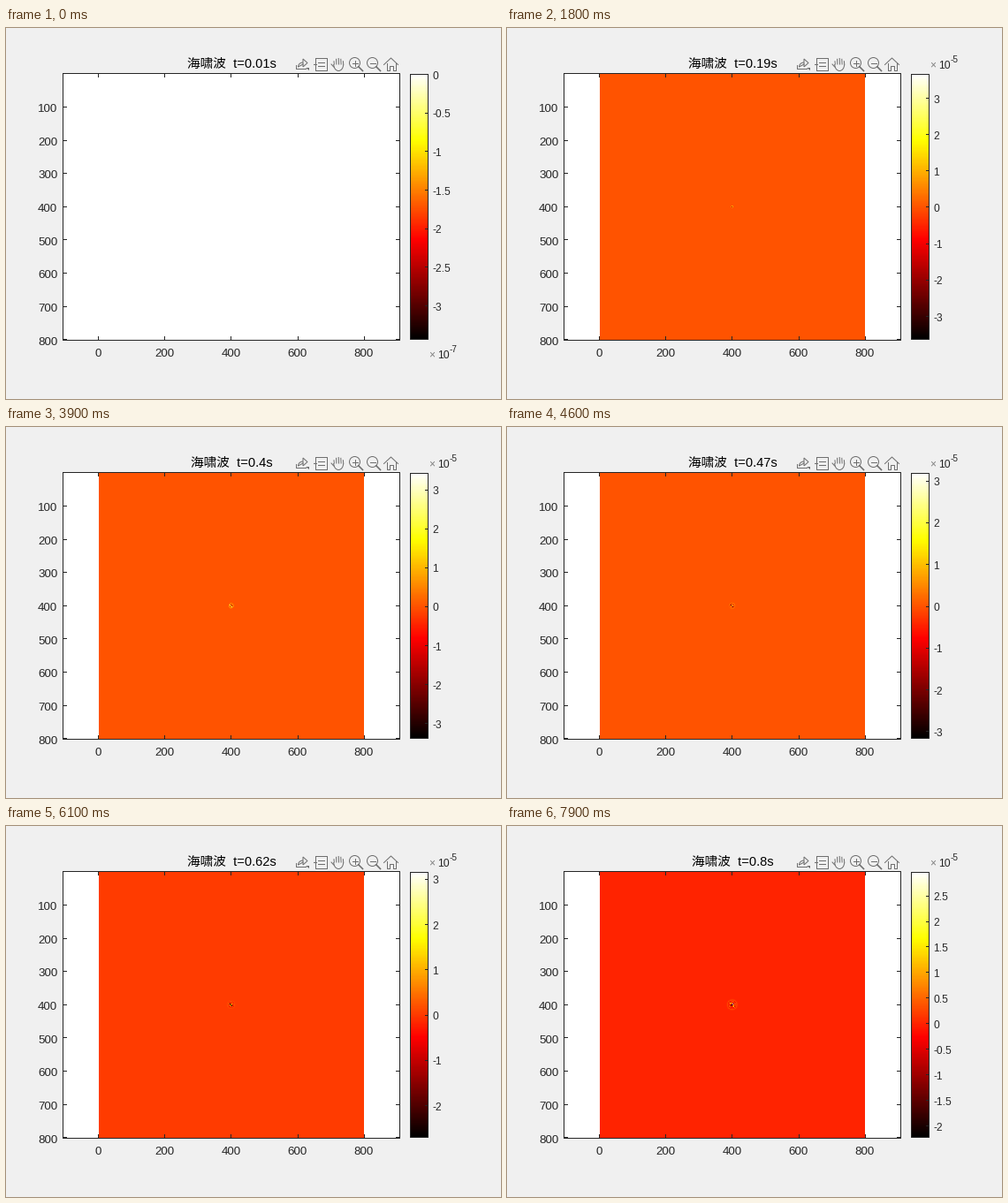
Animation of 560x420 px, one loop 8 s. Source, as a matplotlib script:

```python
import numpy as np
import matplotlib.pyplot as plt
from matplotlib.animation import FuncAnimation
from matplotlib.colors import ListedColormap
from matplotlib.patches import Arc, Circle, Polygon, Rectangle

STEPS = 80
GRID, HALF = 800, 40
L, R, T, B = 64, 445, 51, 353
BAR_L, BAR_R, BAR_T, BAR_B = 457, 477, 52, 352
INK, ICON = "#262626", "#6e6e6e"
PX = 0.72  # points per pixel at 100 dpi

plt.rcParams["font.family"] = ["Liberation Sans", "Noto Sans CJK JP"]

ramp = np.linspace(0, 1, 256)
HOT = ListedColormap(np.clip(
    np.stack([ramp / 0.375, (ramp - 0.375) / 0.375, (ramp - 0.75) / 0.25], axis=1), 0, 1))


def simulate(speed=0.2, omega=0.45):
    """Point-driven wave equation on a small patch around the centre."""
    size = 2 * HALF + 1
    old, now = np.zeros((size, size)), np.zeros((size, size))
    states = []
    for n in range(1, STEPS + 1):
        lap = sum(np.roll(now, s, a) for s in (-1, 1) for a in (0, 1)) - 4 * now
        new = 2 * now - old + speed ** 2 * lap
        new[HALF, HALF] += np.sin(omega * n)
        old, now = now, new
        states.append(now)
    return states


def ripple(n, peak, period):
    return np.cos(2 * np.pi * (n - peak) / period)


def limits(n):
    """Lowest and highest height in units of 1e-5: a quick rise, then slow decay."""
    low = 3.66 - 0.0145 * n + 0.36 * ripple(n, 42.5, 27)
    high = 3.78 - 0.0115 * n + 0.1 * ripple(n, 40, 20)
    low *= 1 - np.exp(-(n / 4.57) ** 3)
    high *= 1 - np.exp(-(max(n - 8, 0) / 4) ** 2)
    return -low, high


def field(n):
    """Full grid of heights, fitted to the limits at step n."""
    u = waves[n - 1]
    lo, hi = limits(n)
    up = u / max(u.max(), 1e-12) * hi
    down = u / min(u.min(), -1e-12) * lo
    full = np.zeros((GRID, GRID))
    a = GRID // 2 - 1 - HALF
    full[a:a + 2 * HALF + 1, a:a + 2 * HALF + 1] = np.where(u > 0, up, down)
    return full


waves = simulate()

fig = plt.figure(figsize=(5.6, 4.2), dpi=100, facecolor="#f0f0f0")
ax = fig.add_axes([0, 0, 1, 1])
ax.axis("off")


def line(xs, ys, color=INK, width=1):
    return ax.plot(xs, ys, color=color, lw=width * PX, zorder=4)[0]


def box(x0, y0, x1, y1, color=INK):
    line([x0, x1, x1, x0, x0], [y0, y0, y1, y1, y0], color)


def label(x, y, s, size, color=INK, **kw):
    return ax.text(x, y, s, fontsize=size * PX, color=color, va="baseline", **kw)


def col(v):
    return 103.8 + 0.3763 * v


def row(v):
    return 51.3 + 0.3763 * v


def draw_axes():
    ax.add_patch(Rectangle((L, T), R - L, B - T, fc="white", ec="none", zorder=0))
    box(L, T, R, B)
    for v in range(0, GRID + 1, 200):
        for edge, d in ((B, -4), (T, 4)):
            line([col(v)] * 2, [edge, edge + d])
        label(col(v), 372, str(v), 13.33, ha="center")
    for v in range(100, GRID + 1, 100):
        for edge, d in ((L, 4), (R, -4)):
            line([edge, edge + d], [row(v)] * 2)
        label(58.3, row(v) + 6.2, str(v), 13.33, ha="right")


def draw_export(x, y):
    line([x - 7, x - 7, x + 4], [y + 1, y + 5, y + 5], ICON)
    ax.add_patch(Arc((x + 1, y + 3), 11, 10, theta1=180, theta2=270, ec=ICON, lw=PX))
    line([x - 4.5, x + 1], [y + 3, y], ICON)
    ax.add_patch(Polygon([(x + 1, y - 6), (x + 6, y - 1.5), (x + 1, y + 3)],
                         fill=False, ec=ICON, lw=PX))
    ax.add_patch(Polygon([(x + 4, y + 4), (x + 8, y + 4), (x + 8, y + 7)],
                         fc=ICON, ec="none"))


def draw_tips(x, y):
    box(x - 6, y - 7, x + 7, y + 7, ICON)
    line([x - 8, x - 5], [y, y], ICON)
    for d in (-2, 2):
        line([x - 3, x + 4], [y + d, y + d], ICON)


def draw_hand(x, y):
    for k in range(5):
        fx = x - 4.5 + 2.6 * k
        line([fx, fx + 0.3], [y - 6.5 + 0.8 * (k - 2) ** 2, y], ICON)
    ax.add_patch(Arc((x + 0.7, y), 11, 15, theta1=0, theta2=180, ec=ICON, lw=PX))
    line([x - 4.8, x - 7.5], [y + 3, y], ICON)


def draw_zoom(x, y, plus):
    ax.add_patch(Circle((x, y), 6, fill=False, ec=ICON, lw=PX))
    line([x + 4.3, x + 9], [y + 4.3, y + 9], ICON, 1.6)
    line([x - 3, x + 3], [y, y], ICON)
    if plus:
        line([x, x], [y - 3, y + 3], ICON)


def draw_home(x, y):
    line([x - 8, x, x + 8], [y + 0.5, y - 7, y + 0.5], ICON)
    for side in (-1, 1):
        line([x + side * k for k in (5, 5, 2, 2, 0)],
             [y - 1, y + 7, y + 7, y + 2, y + 2], ICON)


draw_axes()
draw_export(335, 41)
draw_tips(356, 41)
draw_hand(375.5, 41)
draw_zoom(394.5, 39.5, True)
draw_zoom(414.5, 39.5, False)
draw_home(435.5, 41)

sea = ax.imshow(np.zeros((GRID, GRID)), cmap=HOT, interpolation="nearest",
                extent=(105, 405, 353, 52), aspect="auto", zorder=1)
ax.imshow(ramp[::-1, None], cmap=HOT, interpolation="nearest", aspect="auto",
          extent=(BAR_L, BAR_R, BAR_B, BAR_T), zorder=1)
box(BAR_L, BAR_T, BAR_R, BAR_B)
ax.set_xlim(0, 560)
ax.set_ylim(420, 0)

title = label(255, 45.2, "", 14.67, "black", ha="center")
times = label(478.5, 46, "×", 12, "#808080")
ten = label(488.3, 46, "10", 12.3)
power = label(502, 39.5, "", 10)
scale_marks = []


def draw_scale(lo, hi):
    """Colour bar ticks, labels and exponent."""
    while scale_marks:
        scale_marks.pop().remove()
    exp = int(np.floor(np.log10(max(-lo, hi))))
    lo, hi = lo / 10.0 ** exp, hi / 10.0 ** exp
    span = hi - lo
    step = 1 if span > 5.5 else 0.5 if span > 2.5 else 0.2
    for k in range(int(np.ceil(lo / step)), int(np.floor(hi / step)) + 1):
        y = BAR_T + (hi - k * step) / span * (BAR_B - BAR_T)
        scale_marks.append(line([BAR_R - 3.5, BAR_R], [y, y]))
        scale_marks.append(label(482.5, y + 5.6, f"{k * step:g}", 12))
    base = 373.5 if -lo > hi else 45.7
    times.set_y(base)
    ten.set_y(base)
    power.set_y(base - 6.5)
    power.set_text(str(exp - 5))


def update(i):
    n = i + 1
    lo, hi = limits(n)
    sea.set_data(field(n))
    sea.set_clim(lo, hi)
    title.set_text(f"海啸波  t={n / 100:g}s")
    draw_scale(lo, hi)
    return []


anim = FuncAnimation(fig, update, frames=STEPS, interval=100,
                     repeat=True, repeat_delay=0, blit=False)
plt.show()
```
